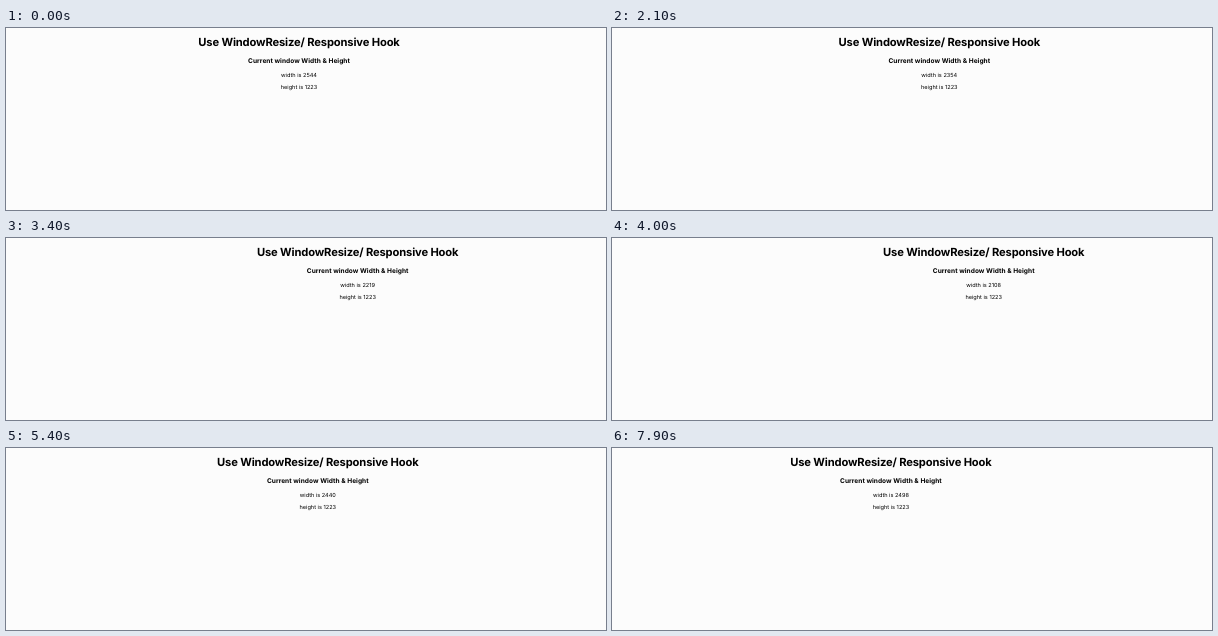
These frames come from a looping animation (600 by 182 pixels, 8000 ms). An HTML page:

```html
<!DOCTYPE html>
<html lang="en">
<head>
<meta charset="utf-8">
<title>Window resize hook</title>
<style>
  html, body { margin: 0; width: 100%; height: 100%; overflow: hidden; background: #fcfcfc; }
  svg { display: block; width: 600px; height: 182px; }
  text {
    font: 5.6px Inter, "Liberation Sans", sans-serif;
    text-anchor: middle;
    text-rendering: geometricPrecision;
  }
  .title { font-size: 11.2px; font-weight: 700; letter-spacing: -.15px; }
  .subtitle { font-size: 6.55px; font-weight: 700; letter-spacing: .04px; }
</style>
</head>
<body>
<svg viewBox="0 0 600 182">
  <g id="page">
    <text class="title" y="18.3">Use WindowResize/ Responsive Hook</text>
    <text class="subtitle" y="34.9">Current window Width &amp; Height</text>
    <text id="width" y="48.6"></text>
    <text y="61.2">height is 1223</text>
  </g>
</svg>
<script>
const LOOP = 8000, STEP = 100;
const FULL_WIDTH = 2560;
const FULL_CENTER = 290.1;
const HALF_SCALE = 0.1805; // stage pixels the centre moves per window pixel

// [time in ms, window width] while the left edge is dragged
const drag = [
  [600, 2544], [1300, 2461], [1500, 2450], [2400, 2307], [2800, 2271],
  [3100, 2234], [3200, 2234], [4000, 2108], [4100, 2098], [4300, 2090],
  [4400, 2090], [4900, 2235], [5300, 2411], [6000, FULL_WIDTH]
];
const RIGHT_DRAG_TIME = 7900, RIGHT_DRAG_WIDTH = 2498;

const rates = drag.slice(1).map(([t, w], i) => (w - drag[i][1]) / (t - drag[i][0]));

// Harmonic mean keeps the curve monotone and at rest on pauses and turns.
function slopeAt(i) {
  const a = rates[i - 1] || 0, b = rates[i] || 0;
  return a * b > 0 ? 2 * a * b / (a + b) : 0;
}

function widthAt(t) {
  if (t <= drag[0][0]) return drag[0][1];
  const i = drag.findIndex(([end]) => t <= end) - 1;
  if (i < 0) return FULL_WIDTH;
  const [t0, w0] = drag[i], [t1, w1] = drag[i + 1];
  const span = t1 - t0, u = (t - t0) / span, v = 1 - u;
  return w0 * v * v * (1 + 2 * u) + w1 * u * u * (3 - 2 * u)
    + span * u * v * (slopeAt(i) * v - slopeAt(i + 1) * u);
}

const page = document.getElementById("page");
const widthLabel = document.getElementById("width");

function draw(now) {
  const t = Math.floor(now % LOOP / STEP) * STEP;
  const fromRight = t >= RIGHT_DRAG_TIME;
  const width = fromRight ? RIGHT_DRAG_WIDTH : Math.round(widthAt(t));
  const shift = (FULL_WIDTH - width) * HALF_SCALE * (fromRight ? -1 : 1);
  page.setAttribute("transform", `translate(${FULL_CENTER + shift} 0)`);
  widthLabel.textContent = `width is ${width}`;
}

const start = performance.now();
function tick() {
  draw(performance.now() - start);
  requestAnimationFrame(tick);
}
tick();
</script>
</body>
</html>
```
